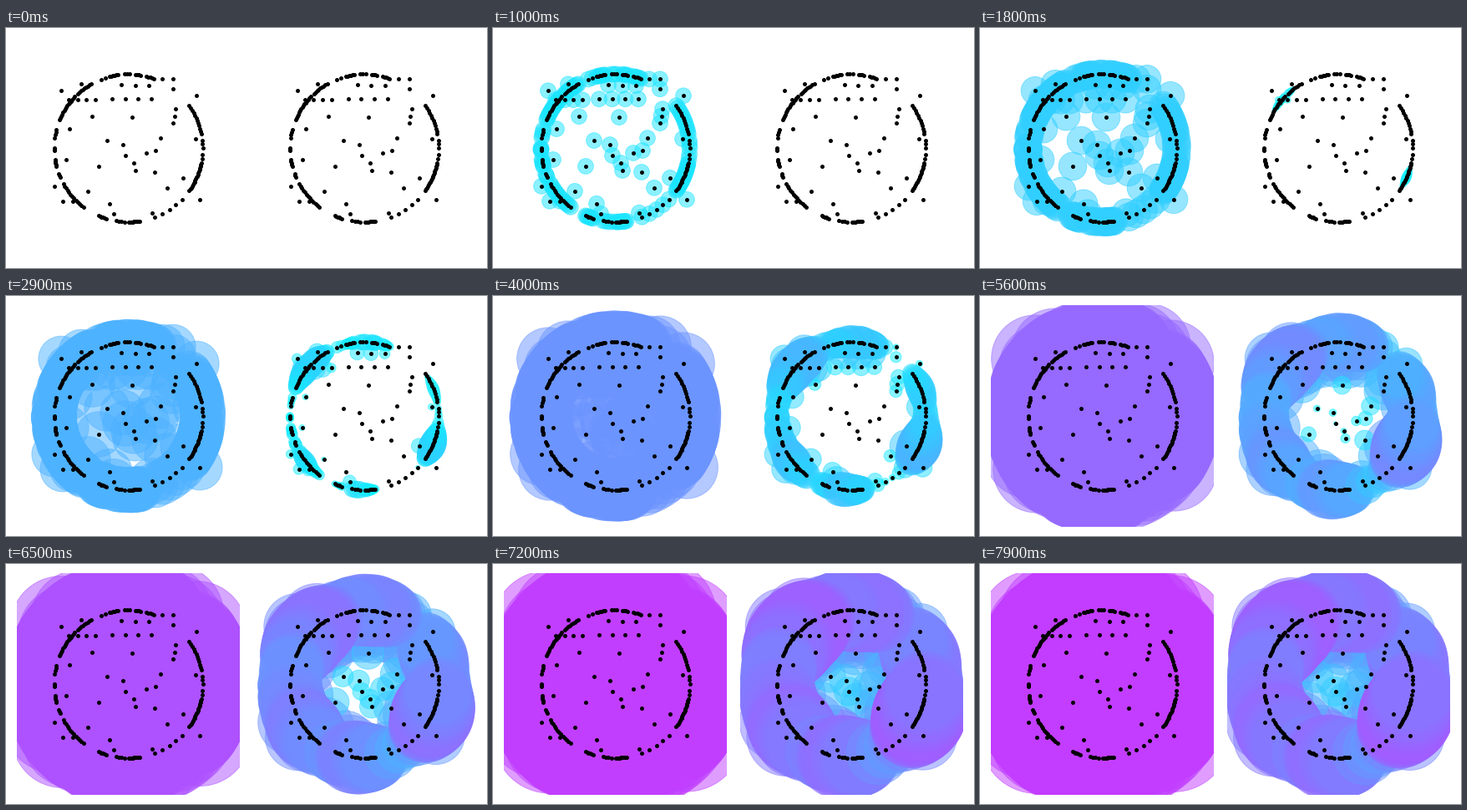
Animation of 576 by 288 pixels, one loop 8000 ms. Source, as a matplotlib script:

```python
import numpy as np
import matplotlib.pyplot as plt
from matplotlib.animation import FuncAnimation

W, H = 576, 288                    # stage in pixels
PANEL_W, PANEL_H, UNIT = 267, 266, 89
CENTRES = (146.5, 144), (429, 144)
FRAMES, STEP, T_MAX = 80, 0.0105, 0.76
NEIGHBOURS, ALPHA = 20, 0.5

# Sampled arcs of the circle: start, stop in degrees, number of points
ARCS = [
    (0, 6, 3), (11, 35, 12), (70, 76, 5), (80.5, 84.5, 4), (89, 93, 3),
    (98, 104.5, 6), (108, 111.5, 2), (120, 132.5, 9), (136, 157.5, 15),
    (165.5, 172, 4), (180, 182, 4), (189, 194.5, 5), (200.5, 203.5, 3),
    (209, 233, 13), (246.5, 252.5, 6), (260.5, 267, 4), (270.5, 278.5, 9),
    (291, 316, 5), (325, 348, 19), (351.5, 355, 2),
]

# Outliers in pixels of the left panel: evenly spaced rows, then lone points
ROWS = [
    ((75, 86), (107, 86), 4), ((127, 85), (174, 85), 4),
    ((138, 68), (171, 69), 3), ((200, 61), (200, 73), 2),
    ((203, 97), (200, 114), 3), ((153, 162), (155, 171), 2),
    ((129, 223), (175, 222), 2),
]
LONE = [
    (66, 75), (90, 67), (187, 61), (228, 81), (227, 133), (212, 180),
    (193, 192), (232, 206), (124, 211), (98, 196), (80, 208), (68, 208),
    (58, 190), (72, 158), (76, 121), (103, 106), (111, 166), (121, 135),
    (140, 140), (143, 153), (151, 107), (168, 150), (179, 147), (178, 173),
    (185, 132),
]


def make_points():
    a = np.radians(np.concatenate([np.linspace(*arc) for arc in ARCS]))
    ring = np.column_stack([np.cos(a), np.sin(a)])
    rows = [np.linspace(*row) for row in ROWS]
    outliers = (np.vstack(rows + [LONE]) - CENTRES[0]) / UNIT * (1, -1)
    return np.vstack([outliers, ring])


def distance_to_measure(pts, k):
    """Root mean square distance from each point to its k nearest points."""
    sq = ((pts[:, None] - pts[None]) ** 2).sum(axis=2)
    return np.sqrt(np.sort(sq, axis=1)[:, :k].mean(axis=1))


def make_panel(cx, cy):
    ax = fig.add_axes([(cx - PANEL_W / 2) / W, 1 - (cy + PANEL_H / 2) / H,
                       PANEL_W / W, PANEL_H / H])
    ax.set(xlim=(-1.5, 1.5), ylim=(-1.5, 1.5))
    ax.axis("off")
    balls = ax.scatter(*points.T, s=np.zeros(len(points)), linewidths=1)
    ax.scatter(*points.T, s=25, color="black", linewidths=0, zorder=3)
    return balls


def grow(balls, radius):
    radius = np.clip(radius, 0, None)
    colors = plt.cm.cool(radius)
    colors[:, 3] = ALPHA * (radius > 0)
    balls.set_sizes((2 * UNIT * radius) ** 2)
    balls.set_facecolor(colors)
    balls.set_edgecolor(colors)


def update(i):
    t = min(STEP * i, T_MAX)
    grow(plain, np.full(len(points), t))
    grow(weighted, t - births)
    return plain, weighted


points = make_points()
births = distance_to_measure(points, NEIGHBOURS)
fig = plt.figure(figsize=(W / 72, H / 72), dpi=72, facecolor="white")
plain, weighted = (make_panel(*c) for c in CENTRES)
anim = FuncAnimation(fig, update, frames=FRAMES, interval=100,
                     repeat=True, repeat_delay=0)
plt.show()
```
